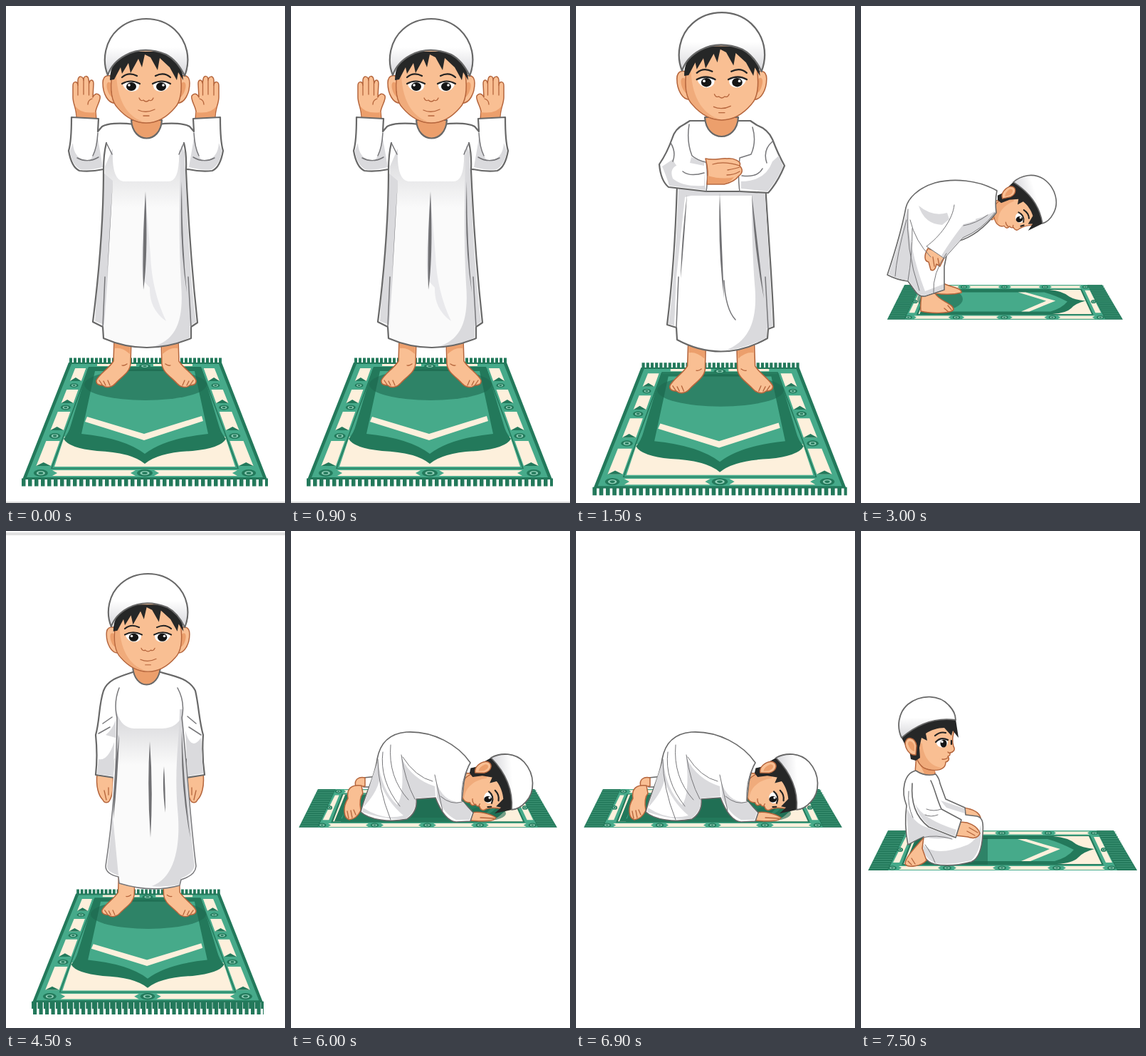
Recreate the animation shown at these times as an HTML page. Size 392 by 697 pixels, loop 8000 ms.

```html
<!DOCTYPE html>
<html lang="en">
<head>
<meta charset="utf-8">
<title>Prayer positions</title>
<style>
  html, body { margin: 0; height: 100%; overflow: hidden; background: #fff; }
  #stage { display: block; width: 100vw; height: 100vh; stroke-linejoin: round; stroke-linecap: round; }
  .cloth { fill: #fff; stroke: #686868; stroke-width: 2.2; }
  .plain { fill: #fff; }
  .outline { fill: none; stroke: #686868; stroke-width: 2.2; }
  .shade { fill: #dadadd; }
  .fold { fill: #707073; }
  .seam { fill: none; stroke: #77777a; stroke-width: 1.5; }
  .skin { fill: #f9bf93; stroke: #b5653c; stroke-width: 1.5; }
  .tan { fill: #ec9f6c; }
  .crease { fill: none; stroke: #b5653c; stroke-width: 1.3; }
  .hair { fill: #262727; }
  .lash { fill: none; stroke: #222; stroke-width: 2.2; }
  .green { fill: #46aa8a; }
  .dark { fill: #23795b; }
  .cream { fill: #fdf0dc; }
  .shadow { fill: #1f6a50; opacity: .6; }
  .fringe { stroke: #23795b; stroke-linecap: butt; }
  .side .cloth { stroke-width: 1.6; }
  .side .seam { stroke-width: 1; }
</style>
</head>
<body>
<svg id="stage" viewBox="0 0 392 697" preserveAspectRatio="none">
  <defs>
    <linearGradient id="capTone" x2="0" y2="1">
      <stop offset=".5" stop-color="#fff"/><stop offset="1" stop-color="#d6d6da"/>
    </linearGradient>
    <linearGradient id="robeTone" x2="0" y2="1">
      <stop stop-color="#d6d6d9"/><stop offset=".3" stop-color="#fafafa"/>
    </linearGradient>

    <g id="frontRug"></g>
    <g id="sideRug"></g>

    <g id="foot">
      <path class="skin" d="M152,468 L151,498 C145,508 131,516 127,525 C126,531 132,532 136,532 C141,537 150,534 154,529 C162,520 174,514 175,502 L176,468Z"/>
      <path class="tan" d="M153,470 L175,474 L174,488 Q163,478 153,480Z"/>
      <path class="crease" d="M131,525 l4,6 M137,526 l3,6 M143,525 l3,7 M170,502 q-4,3 -7,2"/>
    </g>
    <g id="feet">
      <ellipse class="shadow" cx="196" cy="531" rx="86" ry="22"/>
      <use href="#foot"/><use href="#foot" transform="matrix(-1 0 0 1 394 0)"/>
    </g>

    <g id="ear">
      <path class="skin" d="M153,104 C147,94 136,96 136,108 C136,122 143,138 155,136Z"/>
      <path class="tan" d="M150,111 C144,103 140,107 142,116 C144,124 148,129 152,128Z"/>
    </g>
    <g id="eye">
      <path fill="#fff" d="M164,110 Q175,102 187,109 Q188,119 177,120 Q167,119 164,110Z"/>
      <ellipse cx="176" cy="113" rx="7" ry="6" fill="#151515"/>
      <circle cx="173" cy="111" r="1.8" fill="#fff"/>
      <path class="lash" d="M163,109 Q175,102 188,109 M163,100 Q172,92 184,98"/>
    </g>
    <g id="frontHead">
      <use href="#ear"/><use href="#ear" transform="matrix(-1 0 0 1 394 0)"/>
      <path class="skin" d="M149,95 C146,118 148,134 157,143 C170,158 184,164 197,164 C210,164 224,158 237,143 C246,134 248,118 245,95 L232,60 L162,60Z"/>
      <path class="tan" opacity=".6" d="M150,97 C147,118 149,134 158,143 C169,156 182,162 195,163 C174,157 157,138 155,97Z"/>
      <use href="#eye"/><use href="#eye" transform="matrix(-1 0 0 1 394 0)"/>
      <path class="crease" d="M187,129 Q189,134 193,132 Q197,136 201,132 Q205,134 207,129 M186,146 Q197,151 209,145 M193,154 h8"/>
      <path class="hair" d="M146,104 C146,85 155,72 170,64 L225,64 C240,74 248,85 249,104 L242,93 L240,104 L230,86 L216,73 L213,90 L203,72 L195,68 L191,86 L186,74 L175,94 L172,80 L163,95 L161,86 L152,103Z"/>
      <path d="M143,97 C134,75 140,48 157,33 C179,13 215,13 237,33 C255,50 260,75 251,98 C245,85 238,75 225,68 C205,60 185,60 168,69 C155,76 147,85 143,97Z" fill="url(#capTone)" stroke="#686868" stroke-width="2.200"/>
    </g>

    <g id="sideHead">
      <path class="skin" d="M78,312 L76,339 Q92,350 104,340 L101,326Z"/>
      <path class="tan" d="M80,322 L104,336 L103,341 L90,342Z"/>
      <path class="skin" d="M76,292 C74,312 78,325 88,332 C98,337 110,336 114,333 C118,331 119,327 119,324 C123,323 125,320 122,316 C126,315 125,313 125,311 C130,310 133,307 130,302 C128,296 128,290 132,275 L100,262Z"/>
      <path class="tan" opacity=".6" d="M77,296 C76,312 79,325 88,331 C98,336 110,335 113,332 C100,330 88,320 86,298Z"/>
      <ellipse cx="114" cy="297" rx="8" ry="6.5" fill="#fff"/>
      <ellipse cx="116" cy="298" rx="4.5" ry="5.500" fill="#151515"/>
      <circle cx="114" cy="295.500" r="1.700" fill="#fff"/>
      <path class="lash" d="M105,296 Q112,288 122,293 M127,294 v5" stroke-width="1.800"/>
      <path class="lash" d="M104,287 Q111,281 119,283"/>
      <path class="crease" d="M114,320 Q118,321 122,318 M122,310 q2,2 4,1"/>
      <path class="hair" d="M57,290 C80,268 108,260 133,264 L137,290 L129,280 L127,287 L117,276 C108,276 98,279 91,284 L93,294 L85,290 L82,304 L83,318 L77,322 L70,320 L68,308 L62,300Z"/>
      <path class="skin" d="M78,301 C76,289 64,287 62,297 C62,305 68,315 77,314Z"/>
      <path class="tan" d="M75,301 C72,293 66,293 66,299 Q69,308 75,309Z"/>
      <path d="M57,290 C50,275 52,255 66,243 C85,228 110,230 123,244 C131,252 133,259 133,265 C105,261 80,270 57,290Z" fill="url(#capTone)" stroke="#686868" stroke-width="1.800"/>
    </g>

    <g id="raisedArm">
      <path class="skin" d="M99,159 C100,145 94,138 94,128 L94,112 C94,105 100,105 101,111 L101,104 C102,97 108,98 109,104 C109,97 115,97 116,103 L117,108 C118,102 123,103 123,109 L122,128 C125,122 129,122 132,126 C134,131 127,140 126,148 L127,160Z"/>
      <path class="tan" d="M100,157 Q99,146 97,140 Q105,152 126,149 V157Z"/>
      <path class="crease" d="M101,111 V125 M109,104 V124 M116.500,106 V125 M121,130 q-6,2 -6,8"/>
      <path class="cloth" d="M92,156 L130,158 L129,176 L135,169 C142,165 158,163 180,166 L180,230 L137,229 Q118,233 103,231 Q92,226 88,203 Q92,190 92,156Z"/>
      <path class="shade" d="M94,192 Q95,215 116,218 Q126,210 128,180 L136,226 Q117,231 104,229 Q92,222 90,203Z"/>
      <path class="seam" d="M129,178 Q128,198 122,210 M100,213 Q115,221 130,212"/>
    </g>
    <g id="hangingHand">
      <path class="skin" d="M128,340 C126,358 130,371 136,377 C138,382 144,382 146,377 C150,370 151,356 150,342Z"/>
      <path class="crease" d="M138,364 l3,13 M144,360 v10"/>
    </g>
  </defs>

  <g class="scene">
    <rect y="695" width="392" height="2" fill="#dcdcdc"/>
    <use href="#frontRug"/><use href="#feet"/>
    <use href="#raisedArm"/><use href="#raisedArm" transform="matrix(-1 0 0 1 393 0)"/>
    <path class="plain" d="M141,190 L150,168 H243 L251,190 C256,300 262,380 269,444 L260,450 L260,466 Q197,492 137,466 L136,450 L122,443 C130,380 137,310 137,230Z"/>
    <path fill="url(#robeTone)" d="M139,225 L150,200 Q148,244 165,246 H228 Q245,246 243,200 L251,225 L260,440 L258,465 Q197,488 139,465 L138,449 L124,442 C132,380 139,310 139,225Z"/>
    <path class="shade" d="M251,205 C254,300 259,380 267,443 L258,449 V465 Q235,476 206,478 C240,468 250,440 246,390 C242,320 244,250 246,195Z M138,235 L150,245 Q146,310 143,380 L138,447 L125,442Z"/>
    <path fill="#e9e9ec" d="M196,265 Q187,370 193,385 L202,395 Q201,425 225,442 Q205,400 203,350Z"/>
    <path class="fold" d="M196,260 Q191,340 193,398 Q200,350 196,260Z M150,246 Q146,320 142,382 Q145,320 150,246Z M247,246 Q243,330 254,402 Q247,330 247,246Z"/>
    <path class="outline" d="M141,192 Q137,208 137,230 C137,310 130,380 122,443 L136,450 L137,466 Q197,492 260,466 L260,450 L269,444 C262,380 256,300 253,230 Q254,208 250,192"/>
    <path class="seam" d="M141,192 l8,16 M250,192 l-7,16 M136,450 l3,-70 M260,450 l-4,-70"/>
    <path class="tan" stroke="#686868" stroke-width="2.200" d="M176,160 C178,194 217,194 219,160Z"/>
    <use href="#frontHead"/>
  </g>

  <g class="scene">
    <g transform="matrix(1.033 0 0 1.033 .6 -9.5)"><use href="#frontRug"/><use href="#feet"/></g>
    <path class="cloth" d="M142,250 C140,320 135,390 128,447 L141,451 L142,468 Q205,502 269,466 L270,453 L278,450 C276,390 270,320 266,250Z"/>
    <path class="shade" d="M144,256 H265 C269,320 274,390 276,449 L268,452 V465 Q240,480 210,483 C244,470 256,440 251,390 C247,330 247,290 247,266 H162 L153,268 L141,380 L138,448 L130,446 C138,390 142,310 144,256Z"/>
    <path class="fold" d="M202,262 Q199,340 208,410 Q205,340 202,262Z M156,264 Q148,330 147,382 Q152,330 156,264Z M247,264 Q250,340 264,410 Q256,340 247,264Z"/>
    <path class="seam" d="M141,450 l3,-70 M270,452 l-4,-72 M208,385 Q210,425 224,440"/>
    <path class="cloth" d="M160,161 L152,166 Q139,172 135,186 Q128,206 117,222 Q119,245 130,254 L183,260 H230 L270,262 Q283,248 293,224 Q284,208 276,187 Q270,173 254,167 L245,161Z"/>
    <path class="shade" d="M136,215 Q145,238 180,232 L182,258 L131,252 Q126,236 121,225Z M232,246 Q266,246 276,218 L285,210 L291,225 Q281,247 269,260 L232,256Z M162,212 L180,218 V224 L160,220Z"/>
    <path class="plain" d="M146,222 Q156,236 180,230 V252 Q150,254 136,242 Q130,226 146,222Z"/>
    <path class="seam" d="M159,166 Q155,190 163,210 Q170,216 182,219 M248,170 Q254,190 246,208 L230,213 M183,219 Q186,240 183,260 M230,213 Q227,240 230,260 M133,192 Q141,205 136,218 M276,190 Q262,202 268,220 M180,234 Q160,240 150,232 M233,238 Q255,241 262,228"/>
    <path class="skin" d="M182,214 C194,217 204,213 212,214 C222,213 233,218 230,224 Q237,232 229,238 Q222,247 208,250 L184,250 Q187,232 182,214Z"/>
    <path class="tan" d="M185,238 Q205,244 222,240 Q216,248 207,249 H185Z"/>
    <path class="crease" d="M192,222 Q208,217 230,224 M213,230 Q224,228 230,226 M212,237 Q222,237 230,232"/>
    <path class="tan" stroke="#686868" stroke-width="2.200" d="M181,156 C183,192 226,192 228,156Z"/>
    <use href="#frontHead" transform="matrix(1.033 0 0 1.033 1.300 -9.500)"/>
  </g>

  <g class="scene side">
    <use href="#sideRug" transform="matrix(.876 0 0 .87 28 25.600)"/>
    <ellipse class="shadow" cx="111" cy="411" rx="32" ry="16"/>
    <path class="skin" d="M104,390 L118,390 C130,395 142,396 141,402 Q125,406 104,403Z"/>
    <path class="skin" d="M86,403 L104,403 C110,414 130,417 130,426 C125,432 95,431 84,428 Q83,415 86,403Z"/>
    <path class="crease" d="M117,424 l6,5 M122,420 l5,6"/>
    <use href="#sideHead" transform="translate(214 247) rotate(73) scale(.888) translate(-57 -290)"/>
    <path class="cloth" d="M191,259 C165,244 130,241 104,248 C80,255 66,270 63,283 C57,315 46,350 37,377 Q50,384 66,386 L77,401 Q82,408 90,407 L117,398 L117,365 L121,346 L136,330 Q165,322 190,290 Q188,272 191,259Z"/>
    <path class="shade" d="M65,285 Q67,340 90,400 L116,390 V397 L90,406 Q82,406 78,400 L67,385 Q50,383 39,376 Q56,325 65,285Z M81,280 Q89,306 114,307 L124,299 L121,290 Q100,296 81,280Z M188,288 Q165,300 150,300 Q132,318 117,350 L135,329 Q165,319 188,290Z"/>
    <path class="skin" d="M94,340 C88,350 89,358 95,359 L98,370 Q104,373 106,362 L111,365 L119,349Z"/>
    <path class="crease" d="M101,352 l2,13 M108,354 l2,10"/>
    <path class="plain" d="M131,279 C129,300 110,324 92,337 L117,354 L143,325 Q166,316 160,285Z"/>
    <path class="shade" d="M184,292 Q160,302 144,306 Q128,326 113,350 L117,353 L142,325 Q168,315 184,292Z"/>
    <path class="seam" d="M131,279 C129,300 110,324 92,337 L117,354 L143,325 Q170,314 188,290 M66,285 Q62,340 82,399 M69,300 Q76,330 98,352 M64,300 Q50,350 48,379 M72,312 Q72,350 66,385 M120,347 Q100,375 102,402 M144,308 Q162,305 178,293"/>
  </g>

  <g class="scene">
    <rect y="2" width="392" height="4" fill="#e1e1e1"/>
    <path class="fringe" d="M38,669 H362" stroke-width="18" stroke-dasharray="5.200 3.300"/>
    <g transform="matrix(.942 0 0 .93 15.300 43.600)"><use href="#frontRug"/><use href="#feet"/></g>
    <use href="#hangingHand"/><use href="#hangingHand" transform="matrix(-1 0 0 1 405 0)"/>
    <path class="cloth" d="M178,198 C160,204 143,208 137,224 C130,245 132,265 126,286 Q129,315 126,342 L152,346 L153,320 H253 L253,346 L279,342 Q275,315 277,286 C271,265 271,245 266,224 C258,208 240,204 217,198Z"/>
    <path class="shade" d="M130,320 Q143,323 152,296 L151,344 L128,341Z M252,280 Q260,310 274,290 L277,340 L255,344Z M140,286 Q150,278 154,265 V290Z"/>
    <path class="plain" d="M156,240 C155,300 152,390 140,470 Q140,481 158,485 L159,494 Q205,508 244,497 L246,489 Q266,483 267,470 C258,400 252,310 248,240Z"/>
    <path fill="url(#robeTone)" d="M156,255 Q162,276 180,277 H220 Q240,276 247,260 L258,440 L245,494 Q200,505 160,493 L159,484 L143,475Z"/>
    <path class="shade" d="M248,250 C252,320 257,400 265,470 Q262,481 246,487 L243,496 Q222,500 205,498 C238,486 246,440 241,390 C236,330 244,290 244,250Z M156,285 L160,290 L150,400 L158,483 Q142,478 142,470 Q153,390 156,285Z"/>
    <path class="fold" d="M202,295 Q198,360 203,430 Q207,360 202,295Z M159,285 Q151,350 151,404 Q157,350 159,285Z M247,280 Q245,360 259,430 Q250,360 247,280Z M222,330 Q219,360 224,395 Q224,360 222,330Z"/>
    <path class="seam" d="M159,220 Q151,240 156,262 C156,320 152,390 140,470 Q140,481 158,485 L159,494 Q205,508 244,497 L246,489 Q266,483 267,470 C258,400 253,310 247,262 Q252,240 241,220 M136,270 l13,-9 M130,284 l16,-9 M267,270 l-12,-10 M274,286 l-17,-11"/>
    <path class="tan" stroke="#686868" stroke-width="2" d="M178,190 C180,224 215,224 217,190Z"/>
    <use href="#frontHead" transform="matrix(.957 0 0 .94 11 43)"/>
  </g>

  <g class="scene side">
    <use href="#sideRug" transform="matrix(.96 0 0 .964 1.400 -43)"/>
    <path class="dark" d="M84,370 H245 L282,388 L262,408 H70Z"/>
    <path class="shadow" d="M165,374 H235 L245,402 H158Z"/>
    <ellipse class="shadow" cx="276" cy="396" rx="26" ry="10"/>
    <path class="cloth" d="M102,346 L122,344 L118,359 H102Z"/>
    <path class="skin" d="M91,358 C88,348 96,344 104,346 V358Z"/>
    <path class="skin" d="M99,357 C84,355 78,362 80,375 C72,388 74,403 82,405 C90,404 95,398 98,392 Q95,375 101,368Z"/>
    <path class="crease" d="M79,393 l2,10 M84,392 l2,10 M88,391 l3,7"/>
    <path class="skin" d="M250,396 C262,392 280,396 288,402 C285,408 270,407 250,406Z"/>
    <path class="crease" d="M266,402 L285,403"/>
    <use href="#sideHead" transform="translate(281 318) rotate(86.500) scale(.98) translate(-57 -290)"/>
    <path class="cloth" d="M252,325 C235,300 200,280 162,282 C138,284 125,298 121,320 C118,345 104,368 98,394 C110,405 138,409 163,404 Q178,394 176,376 L203,374 C210,392 220,407 232,408 L252,407 L256,395 L240,378 L243,352 Q246,335 252,325Z"/>
    <path class="shade" d="M122,322 Q128,365 149,384 Q160,370 155,318 Q170,348 202,358 L203,372 L175,375 Q177,392 162,403 Q138,407 100,394 Q106,370 122,322Z M204,352 Q215,383 242,380 L254,395 L251,405 H232 Q216,398 205,374Z"/>
    <path class="plain" d="M101,388 Q120,368 124,350 Q135,380 158,399 Q130,407 101,388Z"/>
    <path class="seam" d="M122,320 Q122,360 140,405 M129,310 Q124,350 153,386 M140,300 Q136,345 165,377 M155,314 Q160,350 174,376 M157,317 Q175,345 199,351 M202,342 Q207,365 213,392 M210,372 Q225,385 240,380 M250,328 Q238,352 240,378"/>
  </g>

  <g class="scene side">
    <use href="#sideRug"/>
    <path class="shadow" d="M80,430 H178 V468 H62Z"/>
    <use href="#sideHead"/>
    <path class="skin" d="M144,388 C158,390 166,395 168,402 L146,402Z"/>
    <path class="cloth" d="M77,336 Q90,345 105,341 Q110,347 111,354 L119,376 L146,388 L147,398 L163,400 C172,402 172,412 171,425 C170,445 165,460 155,464 Q125,472 103,467 Q85,462 86,440 L88,428 L66,440 C62,420 62,400 64,385 C56,365 60,340 77,336Z"/>
    <path class="shade" d="M64,388 Q74,408 88,414 L130,430 Q100,434 88,428 L67,438Z M87,440 Q105,458 150,440 Q165,432 168,412 Q172,445 155,462 Q120,470 103,465 Q87,458 87,440Z M112,378 L145,389 L146,396 L120,388Z"/>
    <path class="skin" d="M88,430 C75,445 62,458 62,467 C66,473 85,470 92,462 L86,445Z"/>
    <path class="crease" d="M66,463 l5,5 M71,459 l5,8"/>
    <path class="skin" d="M136,409 C150,406 164,414 167,424 C164,432 155,431 150,429 L133,427Z"/>
    <path class="crease" d="M152,416 L164,423 M149,421 L160,427"/>
    <path class="cloth" d="M72,354 C70,380 76,400 95,415 L133,430 L141,405 L113,390 C106,375 104,362 98,350"/>
    <path class="shade" d="M76,382 Q86,404 134,419 L132,428 L96,414 Q80,400 76,382Z"/>
    <path class="seam" d="M113,390 Q102,394 92,390 M108,398 Q98,402 90,398 M87,430 Q105,425 128,432 M104,465 Q98,450 90,440 M67,365 Q65,385 73,402"/>
  </g>
</svg>

<script>
const shape = (kind, points) => `<polygon class="${kind}" points="${points.join(' ')}"/>`;
const path = (kind, d) => `<path class="${kind}" d="${d}"/>`;
const medallion = (x, y, rx, ry) =>
  `<ellipse class="dark" cx="${x}" cy="${y}" rx="${rx}" ry="${ry}"/>` +
  `<ellipse cx="${x}" cy="${y}" rx="${rx * .6}" ry="${ry * .6}" fill="#8fcdb6"/>` +
  `<ellipse class="dark" cx="${x}" cy="${y}" rx="${rx * .35}" ry="${ry * .35}"/>`;
// Cream strip with arrow-shaped ends.
const strip = (x0, x1, y0, y1, tip) =>
  shape('cream', [x0, y0, x1, y0, x1 - tip, (y0 + y1) / 2, x1, y1, x0, y1, x0 + tip, (y0 + y1) / 2]);

function frontRug() {
  const outer = y => 98 - (y - 506) * .4;
  const inner = y => 113 - (y - 506) * .36;
  const fringe = (x0, x1, y, width, dash) =>
    `<path class="fringe" d="M${x0},${y}H${x1}" stroke-width="${width}" stroke-dasharray="${dash}"/>`;
  let out = fringe(89, 303, 497, 7, '4 2') + fringe(22, 368, 668, 11, '5.5 3.5')
    + shape('dark', [88, 500, 303, 500, 367, 664, 23, 664])
    + shape('green', [92, 502, 299, 502, 361, 661, 29, 661])
    + shape('dark', [116, 506, 274, 506, 327, 649, 63, 649])
    + shape('green', [117, 508, 273, 508, 325, 648, 65, 648])
    + shape('cream', [82, 604, 308, 604, 322, 646, 68, 646]);
  for (const flip of [x => x, x => 390 - x]) {
    for (const [a, b] of [[508, 526], [538, 557], [569, 595], [610, 645]])
      out += shape('cream', [flip(outer(a)), a, flip(inner(a)), a, flip(inner(b)), b, flip(outer(b)), b])
        + shape('dark', [flip(outer(b)), b, flip(inner(b)), b, flip((outer(b) + inner(b)) / 2), b - 5]);
    for (const [y, r] of [[532, 6], [563, 7], [603, 8], [655, 10]])
      out += medallion(flip((outer(y) + inner(y)) / 2), y, r, r * .5);
    out += strip(flip(65), flip(182), 651, 659, flip(0) ? -7 : 7);
    out += strip(flip(128), flip(183), 502, 505, 0);
  }
  return out + medallion(195, 655, 11, 5) + medallion(195, 505, 8, 3)
    + path('dark', 'M115,508 H275 L299,588 Q302,599 309,607 Q302,620 262,624 Q214,626 195,642 Q176,626 128,624 Q88,620 81,607 Q88,599 91,588Z')
    + path('green', 'M125,512 H265 L284,600 Q224,606 195,628 Q166,606 106,600Z')
    + shape('cream', [114, 576, 194, 600, 275, 575, 277, 582, 194, 609, 111, 583]);
}

function sideRug() {
  let out = shape('dark', [38, 420, 355, 420, 388, 476, 10, 476]);
  for (let i = 0; i < 17; i++) {
    const y = 422 + i * 3.2, k = (y - 420) / 56;
    out += `<path d="M${38 - 27 * k},${y}h25M${332 + 30 * k},${y}h24" stroke="#429879" stroke-width="1"/>`;
  }
  out += shape('green', [64, 420, 331, 420, 360, 476, 38, 476])
    + shape('dark', [73, 427, 322, 427, 341, 468.5, 57, 468.5])
    + shape('cream', [75, 428, 320, 428, 338, 467, 60, 467])
    + shape('cream', [63, 429, 69, 429, 54, 465, 45, 465])
    + shape('cream', [327, 429, 335, 429, 353, 465, 344, 465]);
  for (let i = 0; i < 4; i++) {
    out += strip(53 + i * 77, 112 + i * 77, 470, 475, 4);
    out += strip(76 + i * 65, 126 + i * 65, 421.5, 425.5, 3);
  }
  for (let i = 0; i < 5; i++)
    out += medallion(44 + i * 77, 472.5, 6, 3) + medallion(68 + i * 65, 423.5, 5, 2.5);
  out += medallion(55, 447, 4, 3) + medallion(341, 447, 4, 3);
  return out
    + path('dark', 'M78,428 H270 Q292,430 302,439 Q310,444 328,446 Q312,450 305,458 Q297,466 275,467 H62Z')
    + path('green', 'M88,432 H262 Q280,437 299,447 Q290,458 272,463 H72Z')
    + shape('cream', [220, 432, 232, 432, 280, 446, 238, 463, 225, 463, 265, 446]);
}

document.getElementById('frontRug').innerHTML = frontRug();
document.getElementById('sideRug').innerHTML = sideRug();

const LOOP = 8000, HOLD = 1500;
const scenes = document.querySelectorAll('.scene');
function render() {
  const current = Math.floor(performance.now() % LOOP / HOLD);
  scenes.forEach((scene, i) => scene.style.display = i === current ? '' : 'none');
  requestAnimationFrame(render);
}
render();
</script>
</body>
</html>
```
